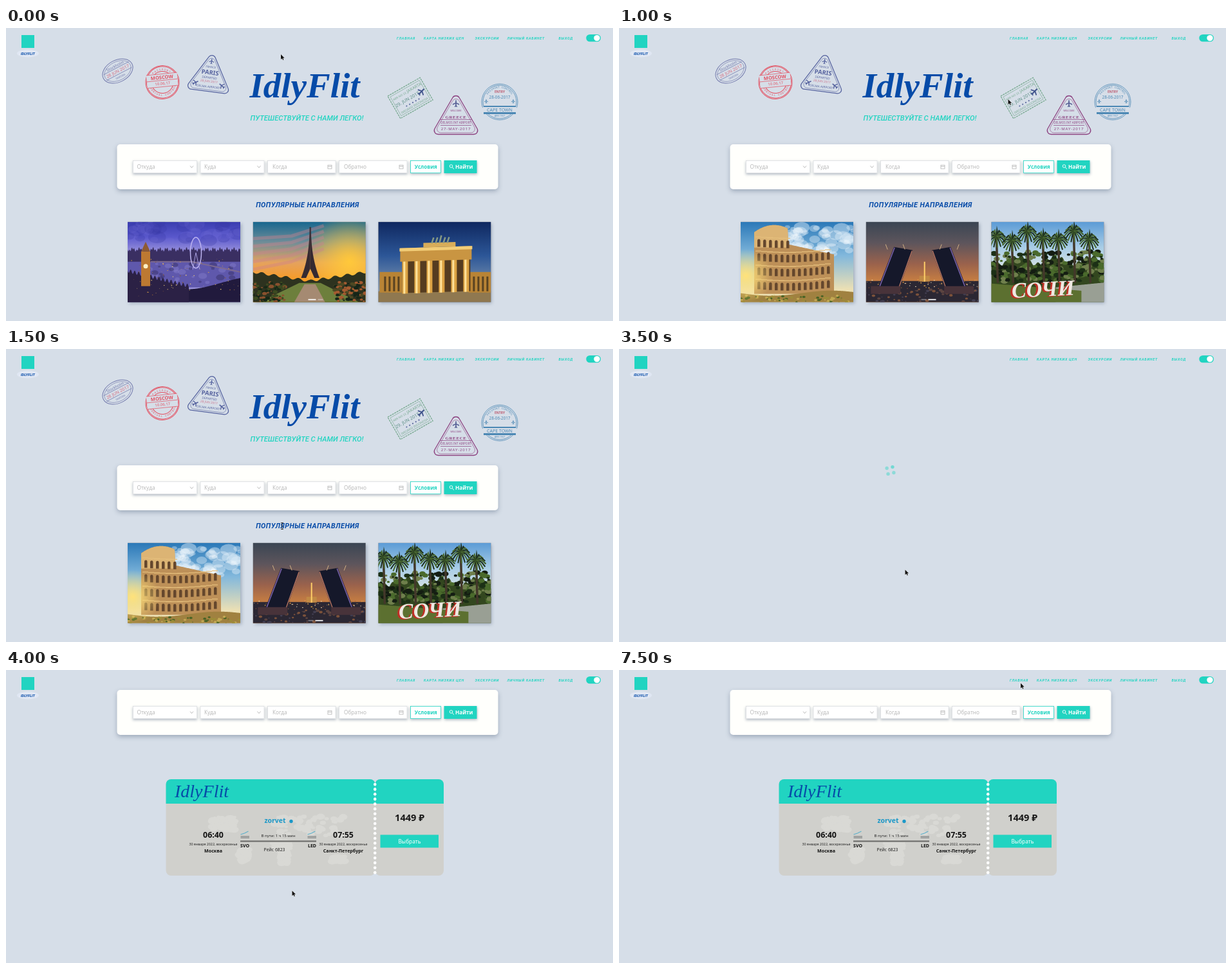
An HTML page with a canvas that plays this animation: 943x456 px, repeating every 8000 ms.

```html
<!DOCTYPE html>
<html lang="ru">
<head>
<meta charset="utf-8">
<title>IdlyFlit</title>
<style>
  html, body { margin: 0; width: 100%; height: 100%; overflow: hidden; background: #d6dee8; }
  canvas { display: block; }
</style>
</head>
<body>
<canvas id="stage" width="943" height="456"></canvas>
<script>
const ctx = document.getElementById('stage').getContext('2d');
const TEAL = '#21d4c1', NAVY = '#064ba8', PAGE = '#d6dee8';
const SANS = '"Noto Sans", "Open Sans", sans-serif';
const HAND = 'Roboto, "Open Sans", sans-serif';
const SCRIPT = '"Liberation Serif", serif';
const LOOP = 8000, TAU = Math.PI * 2;
const { sin, cos, abs } = Math;

// ---------- helpers ----------
function text(str, x, y, size, color, { style = '', align = 'center', gap = 0, family = SANS } = {}) {
  ctx.font = `${style} ${size}px ${family}`;
  ctx.letterSpacing = gap + 'px';
  ctx.textAlign = align;
  ctx.fillStyle = color;
  ctx.fillText(str, x, y);
}
function fill(color) {
  ctx.fillStyle = color;
  ctx.fill();
}
function stroke(color, width) {
  ctx.strokeStyle = color;
  ctx.lineWidth = width;
  ctx.stroke();
}
function rect(color, x, y, w, h, radius = 0) {
  ctx.beginPath();
  ctx.roundRect(x, y, w, h, radius);
  fill(color);
}
function frame(color, x, y, w, h, width = 1) {
  ctx.strokeStyle = color;
  ctx.lineWidth = width;
  ctx.strokeRect(x, y, w, h);
}
function trace(points) {
  ctx.beginPath();
  points.forEach(([x, y]) => ctx.lineTo(x, y));
}
function poly(color, ...points) {
  trace(points);
  fill(color);
}
function line(color, width, ...points) {
  trace(points);
  stroke(color, width);
}
function oval(color, x, y, rx, ry = rx) {
  ctx.beginPath();
  ctx.ellipse(x, y, rx, ry, 0, 0, TAU);
  fill(color);
}
function ring(color, width, x, y, rx, ry = rx) {
  ctx.beginPath();
  ctx.ellipse(x, y, rx, ry, 0, 0, TAU);
  stroke(color, width);
}
// Fills the area between the curve top(x) and a flat bottom.
function hill(color, left, right, top, bottom) {
  ctx.beginPath();
  ctx.moveTo(left, bottom);
  for (let x = left; x <= right; x++) ctx.lineTo(x, top(x));
  ctx.lineTo(right, bottom);
  fill(color);
}
function at(x, y, angle, draw) {
  ctx.save();
  ctx.translate(x, y);
  ctx.rotate(angle);
  draw();
  ctx.restore();
}
function shade(blur, dx, dy, draw) {
  ctx.save();
  Object.assign(ctx, { shadowColor: '#5f708877', shadowBlur: blur, shadowOffsetX: dx, shadowOffsetY: dy });
  draw();
  ctx.restore();
}
function randomizer(seed) {
  return () => (seed = (seed * 16807) % 2147483647) / 2147483647;
}
function specks(count, size, colors, x, y, w, h) {
  const rnd = randomizer(count * 977 + x + y * 31);
  for (let i = 0; i < count; i++) {
    const s = size * (.3 + .7 * rnd());
    oval(colors[i % colors.length], x + rnd() * w, y + rnd() * h, s, s * .7);
  }
}
function backdrop(bottom, ...colors) {
  const g = ctx.createLinearGradient(0, 0, 0, bottom);
  colors.forEach((c, i) => g.addColorStop(i / (colors.length - 1), c));
  rect(g, 0, 0, 175, 125);
}
function glow(color, x, y, r) {
  const g = ctx.createRadialGradient(x, y, 0, x, y, r);
  g.addColorStop(0, color);
  g.addColorStop(1, color + '00');
  rect(g, x - r, y - r, r * 2, r * 2);
}

// ---------- photos, each 175 x 125 ----------
function london() {
  backdrop(48, '#3a3db0', '#5a58cc', '#9c95dd');
  specks(40, 16, ['#7470d833', '#3434a044'], 0, 0, 175, 30);
  hill('#3a2f62', 0, 175, x => 43 + 2 * sin(x * 1.7) + 2 * sin(x * .6), 66);
  rect('#5f58ac', 0, 62, 175, 40);
  specks(40, 7, ['#8a82cf66', '#3b346e88'], 20, 64, 155, 32);
  line('#7d6a90', 2, [36, 62], [100, 62], [175, 78]);
  hill('#211a3d', 0, 175, x => 95 + 10 * sin(x / 35 - 1), 125);
  hill('#2b2145', 0, 95, x => 76 + x * .25 + 3 * sin(x), 125);
  specks(90, 1, ['#d69d46', '#875735', '#f1cd75'], 0, 56, 175, 60);
  ring('#bdb4f0', 1.5, 106, 48, 8.5, 24);
  line('#a99fe0', 1, [101, 74], [106, 48], [112, 74]);
  rect('#bd7932', 21, 46, 14, 54);
  poly('#8d5a34', [21, 46], [28, 31], [35, 46]);
  oval('#fff0c5', 28, 69, 3.5);
}
function paris() {
  backdrop(95, '#17678f', '#6f8d98', '#e5a25e', '#fb9a1c');
  glow('#ffc83a', 150, 62, 75);
  for (let i = 0; i < 5; i++) line('#cc7f8d66', 5, [0, 26 + i * 12], [60, 22 + i * 10], [110, 6 + i * 9]);
  hill('#2d321f', 0, 175, x => 92 - 14 * abs(x - 88) / 88 + 2 * sin(x / 3), 125);
  poly('#6d7f3c', [72, 95], [105, 95], [165, 125], [10, 125]);
  poly('#a58a72', [80, 97], [97, 97], [112, 125], [64, 125]);
  specks(80, 4, ['#172817', '#3c4a20', '#89502d'], 0, 94, 50, 30);
  specks(90, 4, ['#152518', '#4d4823', '#a45a30'], 126, 94, 50, 30);
  for (let y = 8; y < 87; y++) {
    const half = 1 + 13 * (y / 86) ** 2.6, gap = y > 72 ? (y - 72) * .45 : 0;
    rect('#362a31', 89 - half, y, half - gap, 1.3);
    rect('#362a31', 89 + gap, y, half - gap, 1.3);
  }
}
function berlin() {
  backdrop(105, '#0f2860', '#2c5697', '#7f96b0');
  rect('#8f7850', 0, 108, 175, 17);
  for (const x of [2, 140]) {
    rect('#b98435', x, 78, 35, 32);
    for (let i = 1; i < 5; i++) rect('#594221', x + i * 7, 85, 3, 23);
  }
  ctx.save();
  ctx.transform(1, -.03, 0, 1, 0, 2);
  rect('#553c20', 37, 60, 106, 50);
  for (let i = 0; i < 6; i++) {
    rect('#dca343', 37 + i * 19, 58, 9, 53);
    rect('#ffe29a', 39 + i * 19, 58, 3, 53);
  }
  rect('#c99542', 34, 40, 111, 21);
  rect('#f2cd77', 33, 40, 113, 5);
  rect('#d8ad59', 70, 33, 50, 7);
  for (let i = 0; i < 5; i++) line('#879a84', 2.5, [83 + i * 6, 34], [86 + i * 6, 25 - 3 * (i === 2)]);
  ctx.restore();
}
function rome() {
  backdrop(105, '#2a78b8', '#82b8dc', '#ece0b4');
  specks(60, 13, ['#ffffff55', '#dcecf677'], 70, 8, 105, 42);
  const top = x => x < 74 ? 5 + ((x - 52) / 32) ** 2 * 12 : 35 + (x - 74) * .22;
  hill('#bd9058', 21, 145, top, 112);
  hill('#dcb474', 21, 74, top, 40);
  for (let row = 0; row < 4; row++) {
    for (let x = 26; x < (row ? 142 : 72); x += 9) {
      const y = 24 + row * 22 + 5 * sin(x / 45);
      rect('#65472d', x, y, 4.5, 12, [3, 3, 0, 0]);
      rect('#e6bf7c', x - 3, y - 4, 9, 1.3);
    }
  }
  hill('#a08140', 0, 175, x => 111 + 4 * sin(x / 30), 125);
  specks(70, 3, ['#496325', '#9c8c38', '#c2a952'], 0, 114, 175, 11);
  glow('#ffe27a', 8, 84, 42);
}
function bridges() {
  backdrop(98, '#3a4553', '#5d555c', '#9a624c', '#d08440');
  rect('#2b2733', 0, 92, 175, 33);
  specks(90, 1.1, ['#f5b34f', '#a75a33', '#eadab4'], 0, 90, 175, 14);
  specks(60, 3, ['#5c4440', '#433f52', '#7d523a'], 0, 105, 175, 20);
  rect('#c18a46', 83, 84, 16, 9);
  line('#ffce68', 2, [91, 93], [91, 62]);
  for (const side of [1, -1]) {
    at(87.5, 0, 0, () => {
      ctx.scale(side, 1);
      poly('#15182a', [-44, 39], [-15, 44], [-36, 104], [-68, 101]);
      line('#7a62ac', 1.5, [-43, 40], [-66, 100]);
      line('#b87662', 1.3, [-16, 45], [-36, 101]);
      for (const x of [-57, -30]) line('#eac690', .8, [x, 35], [x + 3, 43]);
      rect('#48333a', -80, 100, 46, 12);
    });
  }
}
function sochi() {
  backdrop(80, '#5b9bd6', '#a9cde6', '#dfe8e4');
  hill('#33471f', 0, 175, x => 60 + 6 * sin(x / 9) + 3 * sin(x / 2), 125);
  specks(220, 6, ['#1c3016', '#4a6a2c', '#141d12', '#6f7f4c'], 0, 46, 175, 48);
  hill('#999f94', 100, 175, x => 102 - (x - 100) * .1, 125);
  hill('#5c7030', 0, 140, x => 96 + x * .08, 125);
  for (let tree = 0; tree < 7; tree++) {
    const x = 8 + tree * 24, y = 22 + 8 * sin(tree * 2.2);
    line('#43382a', 3.5, [x, y], [x + 2, 95]);
    for (let a = 0; a < TAU; a += TAU / 17) {
      line(a % .8 < .4 ? '#1d2f1b' : '#4b6a32', 2, [x, y], [x + cos(a) * 9, y + sin(a) * 9],
        [x + cos(a) * 15, y + sin(a) * 12 + 6]);
    }
  }
  at(80, 116, -.05, () => {
    const look = { style: 'italic bold', family: SCRIPT };
    text('СОЧИ', -2, 1, 34, '#bf3026', look);
    text('СОЧИ', 1, 0, 34, '#eee9e2', look);
  });
}
function photo(draw, x) {
  shade(5, 2, 2, () => rect('#888', x, 301.7, 175, 125));
  ctx.save();
  ctx.translate(x, 301.7);
  ctx.beginPath();
  ctx.rect(0, 0, 175, 125);
  ctx.clip();
  draw();
  ctx.restore();
}

// ---------- stamps ----------
function plane(color, x, y, size, angle = 0) {
  at(x, y, angle, () => {
    ctx.scale(size, size);
    line(color, .35, [0, -1], [0, 1]);
    line(color, .3, [-1, .3], [0, -.2], [1, .3]);
    line(color, .25, [-.4, 1], [0, .7], [.4, 1]);
  });
}
function arcText(str, radius, step, size, color, below = false) {
  const dir = below ? -1 : 1;
  [...str].forEach((ch, i) => {
    const turn = dir * (i - (str.length - 1) / 2) * step;
    at(0, 0, turn, () => text(ch, 0, -dir * radius + size * .35, size, color));
  });
}
function triangle(color) {
  for (const [radius, width] of [[44, 1.3], [39, .6]]) {
    const corner = i => [radius * sin(i * TAU / 3), -radius * cos(i * TAU / 3)];
    ctx.beginPath();
    ctx.moveTo(0, radius / 2);
    for (let i = 1; i < 4; i++) ctx.arcTo(...corner(i + 1 - 1), ...corner(i + 1), 6);
    ctx.lineTo(0, radius / 2);
    ctx.beginPath();
    const [sx, sy] = corner(0), [ex, ey] = corner(1);
    ctx.moveTo((sx + ex) / 2, (sy + ey) / 2);
    for (let i = 1; i < 4; i++) ctx.arcTo(...corner(i), ...corner(i + 1), 6);
    ctx.closePath();
    stroke(color, width);
  }
}
function rules(color, half, ...ys) {
  ys.forEach(y => line(color, .7, [-half, y], [half, y]));
}
function ovalStamp(ink) {
  ring(ink, 1, 0, 0, 25, 17);
  ring(ink, .6, 0, 0, 22, 14.5);
  text('Stockholm', 0, -6.5, 6, ink);
  rules(ink, 22, -5, 5);
  text('28 JUN 2017', 0, 2.5, 6.8, '#d46f83');
  text('SWEDEN', 0, 11, 4, ink);
}
function moscowStamp(ink) {
  for (const r of [26, 24.5, 17]) ring(ink, 1, 0, 0, r);
  arcText('PASSPORT', 20, .2, 4, ink);
  arcText('ARRIVAL CONTROL', 20, .17, 4, ink, true);
  rect(PAGE, -24, -13, 48, 20);
  text('MOSCOW', 0, -5, 7.5, ink, { style: 'bold' });
  text('10.06.17', 0, 4, 6, ink);
  rules(ink, 24, -13, -3, 7);
}
function parisStamp(ink) {
  ctx.scale(.94, .94);
  triangle(ink);
  plane(ink, 0, -28, 4);
  text('FRANCE', 0, -17, 4.5, ink);
  text('PARIS', 0, -6, 10, ink, { style: 'bold' });
  text('DEPARTED', 0, 1, 5, ink);
  text('28 JUN 2017', 0, 7, 5, '#cd7189');
  text('DELMA AIRPORT', 0, 16, 5, ink);
  for (const side of [1, -1]) plane(ink, -22 * side, 10, 5, side);
}
function jakartaStamp(ink) {
  ctx.setLineDash([3, 1]);
  frame(ink, -29, -20, 58, 40, 1.3);
  ctx.setLineDash([]);
  frame(ink, -26, -17, 52, 34, .6);
  text('ARR NO 23', -13, -9, 4.5, ink);
  text('JAKARTA', 13, -9, 6.5, ink);
  text('29. JUN 2017', -5, 2, 7, '#5b8e84');
  plane('#41548c', 20, 0, 6, 1.3);
  for (let x = -11; x < 15; x += 5.5) oval('#5f6da0', x, 8, 1.1);
  text('IMIGRASI INDONESIA', 0, 15, 4.7, ink);
}
function greeceStamp(ink) {
  triangle(ink);
  plane('#576096', 0, -26, 5);
  text('WELCOME', 0, -14, 3.5, ink);
  text('GREECE', 0, -3, 7, ink, { style: 'bold', family: SCRIPT, gap: .6 });
  text('DELMOS INT AIRPORT', 0, 5.5, 4.6, ink);
  text('27-MAY-2017', 0, 15.5, 6, ink, { gap: .9 });
  rules(ink, 24, -1, 8);
}
function capeStamp(ink) {
  for (const r of [28, 26]) ring(ink, .8, 0, 0, r);
  arcText('PASSPORT CONTROL', 23, .13, 4.2, ink);
  text('ENTRY', 0, -14, 5, '#bd5b70', { style: 'bold' });
  text('28-06-2017', 0, -5, 6.3, ink);
  for (const side of [1, -1]) plane(ink, -21 * side, -1, 3);
  rect(ink, -25, 6, 50, 13);
  rect(PAGE, -27, 8, 54, 8, 2);
  text('CAPE TOWN', 0, 14.8, 7, ink);
  text('ARR 1937', 0, 23, 3.6, ink);
}
function stamps() {
  at(173.5, 67, -.48, () => ovalStamp('#7279ac'));
  at(243, 84.5, -.1, () => moscowStamp('#e35061'));
  at(316, 78, .13, () => parisStamp('#56639f'));
  at(628, 109, -.52, () => jakartaStamp('#79aa91'));
  at(699, 143.5, 0, () => greeceStamp('#8d4381'));
  at(767, 115, 0, () => capeStamp('#4c88b4'));
}

// ---------- page parts ----------
function header() {
  rect(PAGE, 0, 0, 943, 456);
  rect(TEAL, 24, 11, 20, 20);
  oval('#e0e7f3', 34, 39.5, 17, 6);
  text('IDLYFLIT', 34, 41.7, 5.8, NAVY, { style: 'italic bold', family: HAND });
  const menu = { 'ГЛАВНАЯ': 607, 'КАРТА НИЗКИХ ЦЕН': 649, 'ЭКСКУРСИИ': 728.5, 'ЛИЧНЫЙ КАБИНЕТ': 778.5, 'ВЫХОД': 858.5 };
  for (const label in menu) {
    text(label, menu[label], 17.6, 5.4, TEAL, { style: 'italic bold', align: 'left', gap: .75, family: HAND });
  }
  rect(TEAL, 901.3, 9.9, 22.7, 11.4, 5.7);
  oval('#fff', 918, 15.6, 4.7);
}
function field(label, x, w, isDate) {
  shade(4, 0, 2, () => rect('#fff', x, 25, w, 20));
  frame('#d5d8da', x + .5, 25.5, w - 1, 19, .7);
  text(label, x + (isDate ? 8 : 6.5), 38, 8.2, '#b9b9b9', { align: 'left' });
  const end = x + w - 12.5;
  if (isDate) {
    frame('#b5b5b5', end, 32.5, 6, 5.5, .8);
    line('#b5b5b5', .8, [end, 34.5], [end + 6, 34.5]);
  } else {
    line('#aaa', .8, [end + 1.5, 33.5], [end + 4, 36.5], [end + 6.5, 33.5]);
  }
}
function searchPanel(top) {
  at(0, top, 0, () => {
    shade(7, 0, 3, () => rect('#fffffc', 172.5, 0, 592, 70, 5));
    let x = 197;
    ['Откуда', 'Куда', 'Когда', 'Обратно'].forEach((label, i) => {
      const w = i < 2 ? 100 : 106.5;
      field(label, x, w, i > 1);
      x += w + 4.5;
    });
    shade(4, 0, 2, () => rect('#fff', 628, 25, 48, 20));
    frame(TEAL, 628.5, 25.5, 47, 19, .8);
    text('Условия', 652.3, 37.6, 8, TEAL, { style: '600' });
    shade(4, 0, 2, () => rect(TEAL, 680.5, 25, 51, 20));
    ring('#fff', .9, 691.5, 34, 2.3);
    line('#fff', 1, [693.2, 35.8], [696, 38.5]);
    text('Найти', 711.7, 37.6, 8.2, '#fff', { style: '600' });
  });
}
function home(photos, shift, page) {
  stamps();
  text('IdlyFlit', 464, 108, 55, NAVY, { style: 'italic bold', family: SCRIPT });
  text('ПУТЕШЕСТВУЙТЕ С НАМИ ЛЕГКО!', 467.5, 143.7, 11.2, TEAL, { style: 'italic 500', family: HAND });
  searchPanel(181);
  text('ПОПУЛЯРНЫЕ НАПРАВЛЕНИЯ', 468.5, 279, 10.8, NAVY, { style: 'italic bold', gap: .5, family: HAND });
  photos.forEach((draw, i) => photo(draw, 189 + i * 194.7 + shift));
  let x = 469.5;
  for (let i = 0; i < 2; i++) {
    const w = i === page ? 12 : 8;
    rect(i === page ? '#fff' : '#ffffff66', x, 421.8, w, 1.7);
    x += w + 3;
  }
}
function spinner() {
  for (let i = 0; i < 4; i++) {
    const a = i * TAU / 4 - 1;
    ctx.globalAlpha = i ? .4 : .55;
    oval(TEAL, 421.5 + 6.4 * cos(a), 189 + 6.4 * sin(a), 2.7);
  }
  ctx.globalAlpha = 1;
}
function continent(x, y, w, h) {
  specks(70, 7, ['#d9d9d5'], x, y, w, h);
}
function worldMap() {
  continent(320, 228, 36, 22);
  continent(362, 278, 16, 20);
  continent(415, 266, 26, 14);
  continent(426, 282, 12, 20);
  continent(415, 228, 112, 30);
  continent(506, 290, 20, 8);
}
function airportIcon(x) {
  line('#5bb0cb', 1.2, [x, 256], [x + 6, 254], [x + 12, 251]);
  for (const y of [258.3, 260.5]) rect('#8d9090', x, y, 13.5, 1.5);
}
function flightEnd(x, time, city) {
  text(time, x, 261, 12.4, '#111', { style: 'bold' });
  text('30 января 2022, воскресенье', x, 272.5, 5.3, '#222');
  text(city, x, 284, 7.1, '#111', { style: 'bold' });
}
function ticket() {
  for (const [x, w] of [[248.5, 325], [573.5, 106.5]]) {
    rect('#d0d0cc', x, 170, w, 150, 8);
    rect(TEAL, x, 170, w, 38, [8, 8, 0, 0]);
  }
  text('IdlyFlit', 304, 198, 28, NAVY, { style: 'italic', family: SCRIPT });
  worldMap();
  flightEnd(322, '06:40', 'Москва');
  flightEnd(524, '07:55', 'Санкт-Петербург');
  text('zorvet', 418, 238, 10.5, '#1b98c8', { style: 'bold' });
  oval('#1b98c8', 443, 235.5, 2.7);
  airportIcon(364.5);
  airportIcon(468.5);
  text('В пути: 1 ч 15 мин', 423, 260.3, 6, '#222');
  rect('#969693', 364, 265, 118, 3);
  rect('#6f6f6d', 364, 266, 118, 1);
  text('SVO', 371, 276, 7, '#111', { style: 'bold' });
  text('LED', 475.5, 276, 7, '#111', { style: 'bold' });
  text('Рейс 6823', 417, 282, 6.8, '#222');
  text('1449 ₽', 627, 235, 14.6, '#181818', { style: 'bold' });
  rect(TEAL, 581.5, 256.5, 90.5, 20);
  text('Выбрать', 627, 269.5, 8.2, '#fff');
  for (let y = 178; y < 319; y += 7.63) oval('#fff', 573.2, y, 2.3);
}
function results() {
  searchPanel(31);
  ticket();
}

// ---------- pointers ----------
function arrow() {
  trace([[0, 0], [0, 8], [2, 6.2], [3.2, 9], [4.4, 8.4], [3.2, 5.8], [5.7, 5.7], [0, 0]]);
  stroke('#f4f6f8', 1);
  fill('#111');
}
function beam() {
  rect('#222', 1.6, 0, .9, 11);
  for (const y of [0, 10.2]) rect('#222', 0, y, 4, .8);
}
function hand() {
  ctx.beginPath();
  ctx.roundRect(1, 0, 1.6, 6, .8);
  ctx.roundRect(.5, 4, 5.5, 5.5, 1.5);
  stroke('#222', 1);
  fill('#fff');
}

// ---------- timeline ----------
const FIRST = [london, paris, berlin], SECOND = [rome, bridges, sochi];
const scenes = [
  [0, () => home(FIRST, 0, 0)],
  [500, () => home(SECOND, 184.5, 1)],
  [1000, () => home(SECOND, 0, 1)],
  [3500, spinner],
  [4000, results],
];
const pointers = [
  [0, arrow, 427, 41], [1000, arrow, 604.5, 111], [1500, beam, 427, 270], [2500, hand, 444, 343.5],
  [3500, arrow, 444.5, 343.5], [5000, arrow, 295.5, 281.5], [5500, beam, 491, 268.5],
  [6000, beam, 528, 274.5], [7000, arrow, 594.5, 130], [7500, arrow, 624, 20.5],
];
const current = (steps, time) => steps.findLast(([start]) => start <= time);
const origin = performance.now();
let shown;

function tick() {
  const time = (performance.now() - origin) % LOOP;
  const [sceneStart, drawScene] = current(scenes, time);
  const [pointerStart, drawPointer, x, y] = current(pointers, time);
  const key = `${sceneStart}/${pointerStart}`;
  if (key !== shown) {
    shown = key;
    header();
    drawScene();
    at(x, y, 0, drawPointer);
  }
  requestAnimationFrame(tick);
}
tick();
</script>
</body>
</html>
```
